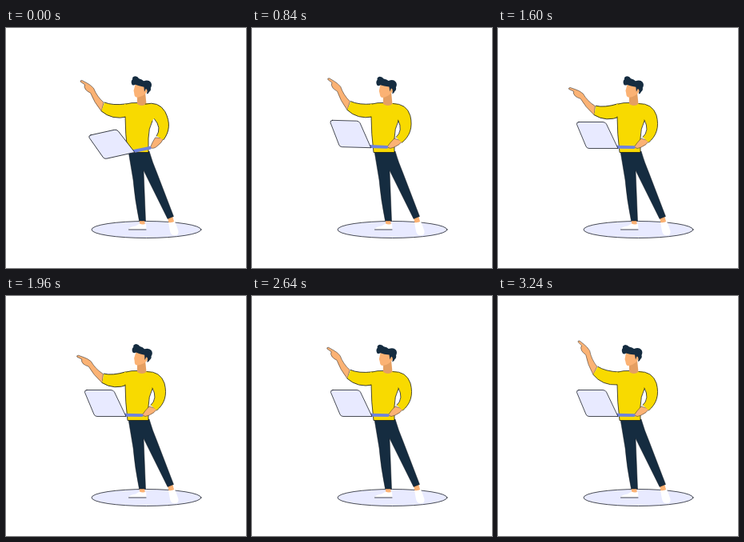
An HTML page that plays this animation: 300 px wide and 300 px high, repeating every 3720 ms.

```html
<!DOCTYPE html>
<html lang="en">
<head>
<meta charset="utf-8">
<title>Man with laptop</title>
<style>
  html, body { margin: 0; height: 100%; overflow: hidden; background: #fff; }
  svg { display: block; width: 100%; height: 100%; }
  .shirt { fill: #f8da00; }
  .skin { fill: #fbb274; }
  .shade { fill: #e59f62; }
  .navy { fill: #152c40; }
  .pale { fill: #e8eaff; }
  .shoe { fill: #fff; }
  .line { fill: none; }
  .line, .edge { stroke: #10151c; stroke-width: .75; stroke-linejoin: round; stroke-linecap: round; }
  .thin { stroke: #10151c; stroke-width: .45; stroke-linejoin: round; }
</style>
</head>
<body>
<svg viewBox="0 0 300 300">
  <ellipse class="pale edge" cx="175.5" cy="252" rx="68.5" ry="10.5"/>

  <!-- legs and shoes -->
  <path class="skin" d="M167 240H173L174 247H167ZM202 237L208 235L211 245L204 246Z"/>
  <path class="shoe" d="M153 251.500Q156 248 162 247.500L167 244.500Q171 246.500 175 244.500L175.500 251.500Z"/>
  <path class="line" d="M153.500 252H175"/>
  <path class="shoe" d="M203 243Q207 244 211 241.500Q214 249 215.500 254Q216 259 211 259.500Q206 259 205 254Z"/>
  <path class="navy thin" d="M153 154H179Q183 168 189 182L209.500 235.500L202 238.500L172 178L174.500 241H166.500Q161 214 159 190Z"/>

  <!-- pointing arm -->
  <g id="arm">
    <path class="skin thin" d="M124 88Q117 79 115 68Q112 63 108 60L102.500 55.500Q100 55 100.500 57L105 61.500Q103 64 105 68Q107 71 110 73Q112 85 119 98Z"/>
    <path class="shirt" d="M125 88Q134 94 152 95L156 103L151 111Q130 112 119 98Z"/>
    <path class="line" d="M151 95Q134 94 125 88M119 98Q130 112 149 111"/>
  </g>

  <!-- torso and head -->
  <path class="shirt" d="M148 95Q156 93 164 93.500L176 94Q188 95 190 104L183 116Q178 126 178 138V155.500H152Q149 132 149 111Z"/>
  <path class="line" d="M149 111Q149 132 152 155.500H178V138Q178 126 183 116M150 95Q157 93 164 93.500"/>
  <path class="shade" d="M164 82L174 80L175.500 95Q170 99 164 95Z"/>
  <g id="head">
    <path class="skin" d="M160 71L158.500 79Q159.500 82 160 85Q161 88 164.500 87Q171 85 174 81Q177 79 176 72Z"/>
    <path class="navy" d="M156 72Q153.500 68 156 65Q155 62 159 61Q162 61 164 63.500Q168 64 170 66Q176 63.500 179 67Q181.500 70 179.500 74Q180.500 77 178 79Q177.500 81.500 175 82Q176.500 76 173.500 75.500L172 79.500L171 73.500Q164 73 160 71.500Q158 73 156 72Z"/>
  </g>

  <!-- arm holding the laptop -->
  <g id="hold">
    <path class="skin thin" d="M179 138Q174 143 170 149Q174 152 179 149Q186 146 189 141Z"/>
    <path class="shirt" d="M175 94.500Q193 94 198 109C202 124 198 135 188.500 143L181 136.500Q190 128 183 115L176 112Z"/>
    <path class="line" d="M176 94.500Q193 94 198 109C202 124 198 135 188.500 143M181 136.500Q190 128 183 115"/>
    <path fill="#6f83dc" d="M148 146.800L170.500 147.300Q172.500 149 170.500 151L148 150.800Z"/>
    <path class="pale edge" d="M101 117.500H131Q134 117.500 135.500 120L150 150.500H114Q111 150.500 110 148L98.500 120.500Q98 117.500 101 117.500Z"/>
  </g>
</svg>
<script>
  const LOOP = 3720, MOVE_END = 3240, STEP = 40;

  // Pivot and [time, degrees] keys of each moving part
  const parts = {
    arm: { pivot: '150 100', keys: [[0, -11], [360, 0], [1440, -20], [1840, -20], [3420, 0]] },
    head: { pivot: '169 92', keys: [[0, 4.5], [320, 7], [1000, .5], [2100, 7], [2900, 0]] },
    hold: { pivot: '178 103', keys: [[0, -12.5], [440, 3.5], [1200, 0]] }
  };

  function angleAt(keys, t) {
    const i = keys.findIndex(k => k[0] > t);
    if (i < 0) return keys[keys.length - 1][1];
    const [t0, a] = keys[i - 1], [t1, b] = keys[i];
    return a + (b - a) * (1 - Math.cos(Math.PI * (t - t0) / (t1 - t0))) / 2;
  }

  const start = performance.now();

  function draw() {
    const now = Math.max(0, performance.now() - start) % LOOP;
    const t = Math.min(Math.floor(now / STEP) * STEP, MOVE_END);
    for (const [id, { pivot, keys }] of Object.entries(parts)) {
      document.getElementById(id).setAttribute('transform', `rotate(${angleAt(keys, t)} ${pivot})`);
    }
    requestAnimationFrame(draw);
  }
  draw();
</script>
</body>
</html>
```
